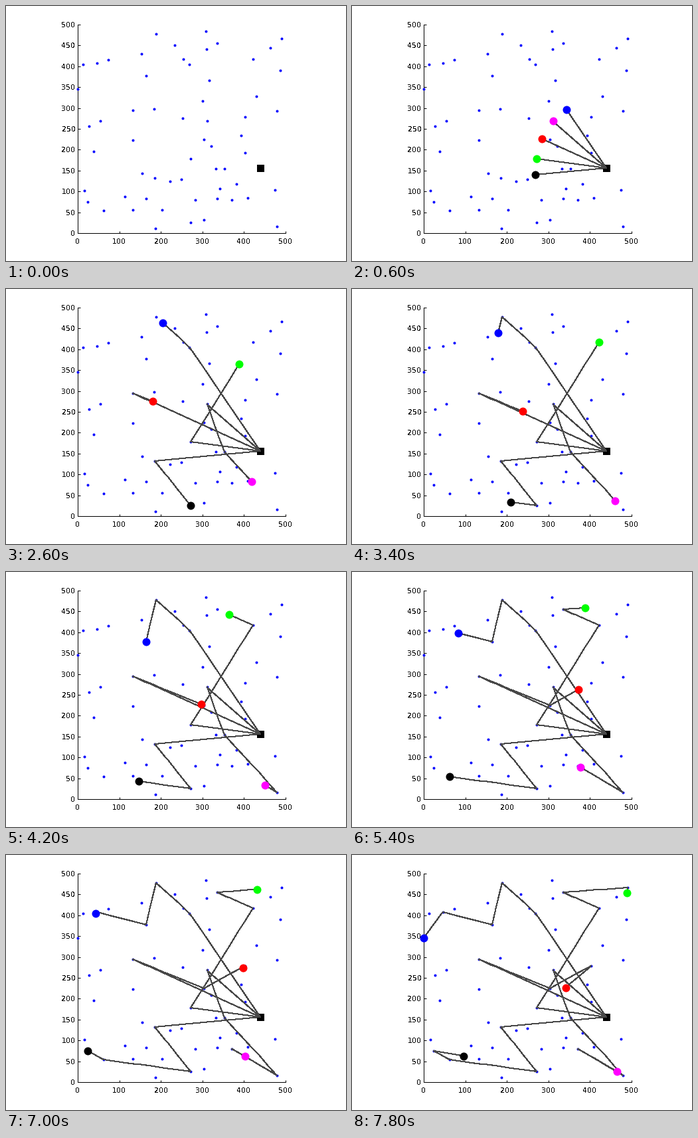
These frames come from a looping animation (512x384 px, 8 s). A matplotlib script:

```python
import matplotlib.pyplot as plt
import numpy as np
from matplotlib.animation import FuncAnimation

DPI = 100
W, H = 512, 384
PX = 72 / DPI                       # one pixel in points
LEFT, BOTTOM = 108, 42
SIZE = 500
SPAN = np.array([313, 314])         # plot area in pixels
STEP_MS = 200
FRAMES = 40

DEPOT = (440, 156)
SPARE_NODES = 36

# Per vehicle: colour, speed, stops in order
FLEET = [
    ("#ff0000", 1.0, [(132, 295), (303, 225), (403, 279), (321, 208)]),
    ("#0000ff", 0.995, [(269, 405), (188, 478), (164, 378), (46, 408), (0, 346)]),
    ("#00ff00", 1.0, [(271, 178), (422, 417), (335, 455), (490, 467), (474, 104)]),
    ("#000000", 1.008, [(185, 132), (272, 25), (62, 54), (24, 75), (132, 56)]),
    ("#ff00ff", 1.0, [(311, 269), (353, 154), (480, 16), (371, 80), (480, 16)]),
]


def snap(points):
    """Round data coordinates to whole pixels."""
    scale = SPAN / SIZE
    return np.round(points * scale) / scale


def arrivals(speed, stops):
    """Clock times at the depot and at each stop."""
    legs = np.diff([DEPOT, *stops], axis=0)
    return np.concatenate([[0], np.cumsum(np.hypot(*legs.T)) / speed])


def scatter_nodes(taken, count, gap=18):
    """Add random nodes that keep clear of those already placed."""
    rng = np.random.default_rng(7)
    nodes = list(taken)
    while len(nodes) < len(taken) + count:
        spot = rng.uniform(10, SIZE - 10, 2)
        if min(np.hypot(*(spot - node)) for node in nodes) > gap:
            nodes.append(spot)
    return np.array(nodes)


# The clock jumps from one arrival to the next
clock = np.sort(np.concatenate([arrivals(v, stops)[1:] for _, v, stops in FLEET]))
clock = np.concatenate([[0], clock[:FRAMES // 2]])


def trail(speed, stops):
    """Vehicle positions at every tick of the clock."""
    times = arrivals(speed, stops)
    x, y = np.array([DEPOT, *stops]).T
    return snap(np.column_stack([np.interp(clock, times, x),
                                 np.interp(clock, times, y)]))


plt.rcParams.update({"font.family": "DejaVu Sans", "text.antialiased": False})
fig = plt.figure(figsize=(W / DPI, H / DPI), dpi=DPI, facecolor="white")
ax = fig.add_axes([LEFT / W, BOTTOM / H, SPAN[0] / W, SPAN[1] / H])
ax.set(xlim=(0, SIZE), ylim=(0, SIZE),
       xticks=range(0, SIZE + 1, 100), yticks=range(0, SIZE + 1, 50))
ax.spines[["top", "right"]].set_visible(False)
for side in ("left", "bottom"):
    ax.spines[side].set_linewidth(PX)
ax.tick_params(direction="in", length=3.5 * PX, width=PX, labelsize=11 * PX)
ax.tick_params(axis="x", pad=7.5 * PX)
ax.tick_params(axis="y", pad=3.5 * PX)


def markers(shape, size, color, z):
    line, = ax.plot([], [], shape, ms=size * PX, mfc=color, mew=0,
                    antialiased=False, clip_on=False, zorder=z)
    return line


stop_nodes = sorted({stop for _, _, stops in FLEET for stop in stops})
nodes = scatter_nodes([DEPOT, *stop_nodes], SPARE_NODES)
markers("o", 4, "#0000ff", 3).set_data(*snap(nodes).T)
markers("s", 11, "black", 4).set_data(*snap(np.array([DEPOT])).T)

vehicles = []
for color, speed, stops in FLEET:
    line, = ax.plot([], [], color="#484848", lw=PX, antialiased=False,
                    clip_on=False, zorder=5)
    vehicles.append((trail(speed, stops), line, markers("o", 12, color, 6)))


def draw(i):
    step = (i + 1) // 2
    for path, line, dot in vehicles:
        line.set_data(*path[:step + 1].T)
        dot.set_data(*path[step:step + 1].T)
        dot.set_visible(step > 0)
    return [artist for _, *pair in vehicles for artist in pair]


anim = FuncAnimation(fig, draw, frames=FRAMES, interval=STEP_MS,
                     repeat=True, repeat_delay=0)
plt.show()
```
